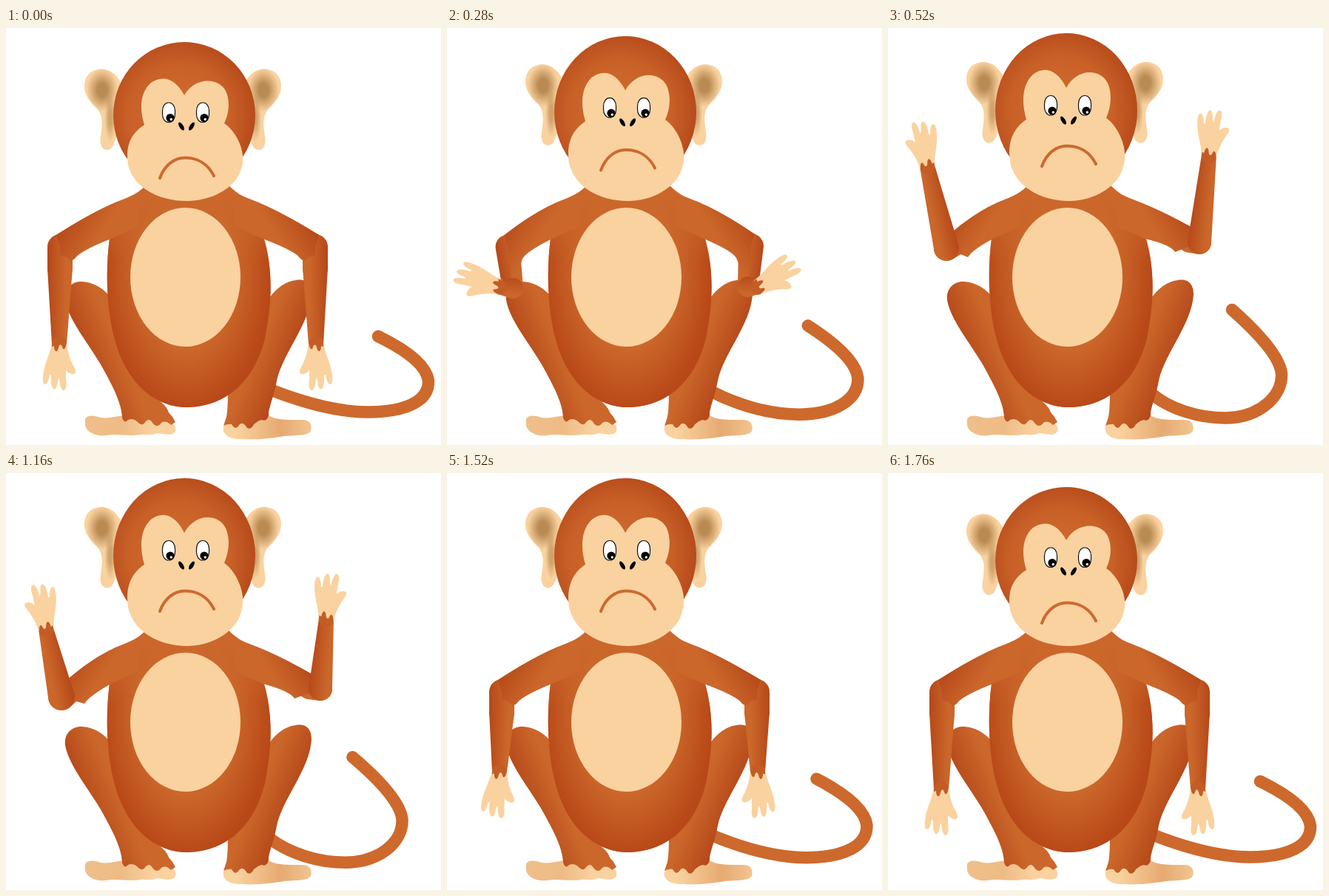
An HTML page that plays this animation: 588 by 564 pixels, repeating every 2 s.

```html
<!DOCTYPE html>
<html lang="en">
<head>
<meta charset="utf-8">
<title>Shrugging monkey</title>
<style>
html, body { margin: 0; width: 100%; height: 100%; overflow: hidden; background: #fff; }
svg { display: block; width: 588px; height: 564px; }
</style>
</head>
<body>
<svg viewBox="0 0 588 564">
  <defs>
    <radialGradient id="headFill" gradientUnits="userSpaceOnUse" cx="234" cy="118" r="106">
      <stop offset=".3" stop-color="#cd692c"/><stop offset=".65" stop-color="#c86028"/><stop offset="1" stop-color="#b64a1a"/>
    </radialGradient>
    <radialGradient id="bodyShade" gradientUnits="userSpaceOnUse" cx="0" cy="0" r="1" gradientTransform="translate(244 325) scale(114 192)">
      <stop offset=".58" stop-color="#b84818" stop-opacity="0"/><stop offset="1" stop-color="#b84818"/>
    </radialGradient>
    <linearGradient id="fade" gradientUnits="userSpaceOnUse" x1="0" y1="235" x2="0" y2="315">
      <stop offset="0" stop-color="#000"/><stop offset="1" stop-color="#fff"/>
    </linearGradient>
    <mask id="lower" maskUnits="userSpaceOnUse" x="0" y="0" width="588" height="564">
      <rect width="588" height="564" fill="url(#fade)"/>
    </mask>
    <linearGradient id="limb">
      <stop offset="0" stop-color="#b54819"/><stop offset=".75" stop-color="#cb672b"/>
    </linearGradient>
    <linearGradient id="legL" href="#limb" gradientUnits="userSpaceOnUse" x1="83" y1="395" x2="143" y2="370"/>
    <linearGradient id="legR" href="#limb" gradientUnits="userSpaceOnUse" x1="409" y1="395" x2="349" y2="370"/>
    <linearGradient id="upperL" href="#limb" gradientUnits="userSpaceOnUse" x1="76" y1="262" x2="135" y2="300"/>
    <linearGradient id="upperR" href="#limb" gradientUnits="userSpaceOnUse" x1="415" y1="262" x2="356" y2="300"/>
    <linearGradient id="foreL" href="#limb" gradientUnits="userSpaceOnUse" x1="-17" y1="0" x2="17" y2="0"/>
    <linearGradient id="foreR" href="#limb" gradientUnits="userSpaceOnUse" x1="17" y1="0" x2="-17" y2="0"/>
    <linearGradient id="footL">
      <stop offset="0" stop-color="#efbf8b"/><stop offset=".4" stop-color="#eebb85"/><stop offset=".75" stop-color="#fad29f"/>
    </linearGradient>
    <linearGradient id="footR">
      <stop offset=".15" stop-color="#fad29f"/><stop offset=".65" stop-color="#e6aa72"/><stop offset="1" stop-color="#f2c590"/>
    </linearGradient>
    <radialGradient id="earShade">
      <stop offset=".3" stop-color="#b98a52"/><stop offset="1" stop-color="#b98a52" stop-opacity="0"/>
    </radialGradient>
    <g id="ear">
      <path fill="#fad29f" d="M160,84 C150,58 135,54 124,56 C108,59 104,74 107,86 C110,97 118,103 124,110 C132,121 130,132 128,147 C126,158 130,165 137,165 C145,164 146,156 149,147 L162,150Z"/>
      <ellipse cx="130" cy="84" rx="21" ry="29" fill="url(#earShade)"/>
      <ellipse cx="141" cy="121" rx="8" ry="33" fill="url(#earShade)" opacity=".65"/>
    </g>
    <g id="eye">
      <rect x="-8.5" y="-13" width="17" height="26.5" rx="8" ry="11" fill="#fff" stroke="#111" stroke-width="1.2"/>
      <circle cx="2" cy="7.5" r="5.6"/>
      <circle cx="3.3" cy="9.5" r="1.7" fill="#fff"/>
    </g>
    <g id="hand">
      <path fill="#fad29f" d="M-10,-3 C-12,12 -19,24 -21,36 Q-24,52 -20,54 Q-15,55 -13,41 L-11,42 Q-12,56 -8,60 Q-3,62 -2,49 L0,45 Q1,62 6,62 Q11,61 9,47 L9,35 Q14,41 20,40 Q25,38 18,27 Q11,12 10,-3Z"/>
      <path fill="#c45c26" d="M-10,-2 A10,9 0 0 1 10,-2 L9,2 Q8,7 5,6 L3,1 Q0,-1 -1,4 Q-2,10 -5,9 Q-7,7 -7,2 L-10,3Z"/>
    </g>
  </defs>

  <path id="tail" fill="none" stroke="#cd692c" stroke-width="16.5" stroke-linecap="round"/>

  <path fill="url(#footL)" d="M107,533 C105,523 118,523 128,527 C140,529 150,524 165,524 L215,528 C228,533 232,542 228,547 C222,552 212,549 205,548 C195,552 188,549 182,550 C165,553 150,548 135,551 C120,553 105,545 107,533Z"/>
  <path fill="url(#footR)" d="M294,545 C292,535 300,530 320,530 L355,524 C365,531 385,530 400,530 C412,530 414,538 412,545 C408,553 385,550 370,553 C350,556 335,557 320,556 C305,557 296,552 294,545Z"/>
  <path fill="url(#legL)" d="M80,368 C78,350 92,342 103,343 C120,344 133,353 145,368 L200,500 Q216,508 220,520 Q226,526 229,533 L223,537 Q216,530 210,534 Q204,542 198,534 Q194,527 189,532 Q184,540 178,533 Q172,527 165,530 Q160,536 157,527 C156,508 146,488 134,466 C118,434 85,398 80,368Z"/>
  <path fill="url(#legR)" d="M413,360 C413,343 402,339 392,341 C376,343 364,353 354,368 L300,490 Q300,515 298,526 L294,538 Q300,535 305,536 Q310,545 315,537 Q320,531 326,541 Q331,544 335,536 Q342,530 346,530 Q352,533 355,524 C354,515 362,500 366,477 C374,440 411,400 413,360Z"/>

  <g id="torso"></g>
  <ellipse cx="242.5" cy="337" rx="74.5" ry="94" fill="#fad29f"/>
  <g id="arms"></g>

  <g id="ears">
    <use href="#ear"/>
    <use href="#ear" transform="translate(478 0) scale(-1 1)"/>
  </g>
  <ellipse id="skull" cx="241" cy="118" rx="96" ry="99" fill="url(#headFill)"/>
  <path id="face" fill="#fad29f" d="M187,131 C165,145 162,165 165,185 C172,215 205,234 245,234 C290,233 315,207 318,190 C326,170 312,140 295,129 C303,112 302,96 297,85 C287,66 255,66 241,91 C228,66 210,64 196,74 C180,88 181,112 187,131Z"/>
  <g id="eyes">
    <use href="#eye" x="220" y="114"/>
    <use href="#eye" x="266" y="114"/>
  </g>
  <g id="nose">
    <ellipse rx="2.6" ry="6.2" transform="translate(237 133) rotate(-32)"/>
    <ellipse rx="2.6" ry="6.2" transform="translate(251 133) rotate(32)"/>
  </g>
  <path id="mouth" fill="none" stroke="#cd6a30" stroke-width="4" stroke-linecap="round" d="M208,203 C214,186 227,175.500 242,175.500 C259,175.500 273,184 281,200"/>
</svg>

<script>
const $ = id => document.getElementById(id);
const clamp = v => Math.max(0, Math.min(1, v));
const mix = (a, b, f) => a.map((v, i) => v + (b[i] - v) * f);

function add(parent, tag, attrs) {
  const el = document.createElementNS('http://www.w3.org/2000/svg', tag);
  for (const k in attrs) el.setAttribute(k, attrs[k]);
  return parent.appendChild(el);
}

const torso = 'M190,212 Q178,224 165,229 L140,284 C134,330 136,385 148,425 C162,475 197,513 245,513 ' +
  'C296,512 335,480 350,420 C360,370 361,325 348,282 L322,229 Q310,222 300,212Z';
add($('torso'), 'path', { d: torso, fill: '#cb672b' });
add($('torso'), 'path', { d: torso, fill: 'url(#bodyShade)', mask: 'url(#lower)' });

// Columns: lift, elbow x y r, bend x y r, wrist x y, hand angle
const left = [
  [0, 73, 296, 17, 73, 325, 17, 72, 428, 0],
  [.09, 74, 296, 17, 74, 324, 17, 71, 405, 3],
  [.4, 82, 296, 16.5, 89, 352, 14, 70, 350, 104],
  [.545, 82, 298, 17, 73, 344, 18, 55, 311, 157],
  [.909, 86, 296, 16, 75, 303, 18, 54, 211, 169],
  [1, 88, 294, 16, 79, 298, 17, 53, 187, 168]
];
const right = [
  [0, 418, 296, 17, 418, 325, 17, 419, 428, 0],
  [.09, 419, 296, 17, 419, 324, 17, 420, 405, 1],
  [.4, 411, 295, 17, 407, 350, 14, 421, 350, 118],
  [.545, 412, 296, 17, 427, 341, 17, 434, 305, 170],
  [.909, 410, 289, 17, 425, 292, 16, 433, 197, 172],
  [1, 408, 287, 17, 421, 290, 16, 434, 172, 172]
];

function makeArm(poses, side, dir) {
  const g = add($('arms'), 'g', {});
  const fore = { fill: `url(#fore${side})` };
  const link = add(g, 'path', fore);
  const upper = add(g, 'path', { fill: `url(#upper${side})` });
  const lower = add(g, 'path', fore);
  const hand = add(g, 'use', { href: '#hand' });
  return { poses, dir, link, upper, lower, hand };
}
const arms = [makeArm(left, 'L', 1), makeArm(right, 'R', -1)];

// Tapered tube from one joint to the next, drawn along local y
function tube(el, x, y, r, x2, y2, r2, end) {
  const len = Math.hypot(x2 - x, y2 - y);
  const turn = Math.atan2(x - x2, y2 - y) * 180 / Math.PI;
  el.setAttribute('d', `M${-r},0 A${r},${r} 0 0 1 ${r},0 L${r2},${len} ${end ? `A${r2},${r2} 0 0 1` : 'L'} ${-r2},${len}Z`);
  el.setAttribute('transform', `translate(${x} ${y}) rotate(${turn})`);
}

function poseAt(poses, lift) {
  let i = 1;
  while (i < poses.length - 1 && poses[i][0] < lift) i++;
  const a = poses[i - 1], b = poses[i];
  return mix(a, b, clamp((lift - a[0]) / (b[0] - a[0])));
}

function drawArm({ poses, dir, link, upper, lower, hand }, lift) {
  const [, ex, ey, er, bx, by, br, wx, wy, turn] = poseAt(poses, lift);
  const m = x => dir > 0 ? x : 489 - x;
  tube(link, ex, ey, er, bx, by, br, true);
  tube(lower, bx, by, br, wx, wy, 10, false);
  upper.setAttribute('d', `M${m(180)},222 Q${m(168)},228 ${m(160)},231 Q${m(122)},245 ${ex - dir * er * .3},${ey - er * .95} ` +
    `L${ex},${ey} L${bx},${by} L${ex + dir * 20},${ey + 16} Q${ex + dir * 26},${ey + 6} ${m(142)},285 L${m(180)},268Z`);
  hand.setAttribute('transform', `translate(${wx} ${wy}) rotate(${dir * turn}) scale(${dir} 1)`);
}

const tailDown = [357, 489, 400, 506, 445, 519.5, 490, 519.5, 540, 519, 572, 505, 571, 477, 568, 455, 540, 435, 503, 417];
const tailUp = [357, 495, 380, 515, 420, 527.5, 456, 527.5, 500, 527, 533, 500, 532, 468, 530, 445, 500, 412, 465, 381];

function shift(id, dy) { $(id).setAttribute('transform', `translate(0 ${dy})`); }
function stretch(id, s) { $(id).setAttribute('transform', `translate(0 ${234 * (1 - s)}) scale(1 ${s})`); }

function draw(ms) {
  const k = Math.floor(ms % 2000 / 40);
  const lift = k < 29 ? clamp((k - 3) / 10) : clamp(1 - (k - 28) / 11);
  const nod = k < 29 ? clamp((k - 3) / 6) : clamp(1 - (k - 38) / 6);
  const [x, y, ...curve] = mix(tailDown, tailUp, lift);
  $('tail').setAttribute('d', `M${x},${y} C${curve.join(' ')}`);
  arms.forEach(arm => drawArm(arm, lift));
  stretch('skull', 1 + .056 * nod);
  stretch('face', 1 + .07 * nod);
  shift('ears', -9.5 * nod);
  shift('eyes', -9.5 * nod);
  shift('nose', -8 * nod);
  shift('mouth', -16 * nod);
}

const start = performance.now();
function tick() {
  draw(performance.now() - start);
  requestAnimationFrame(tick);
}
tick();
</script>
</body>
</html>
```
